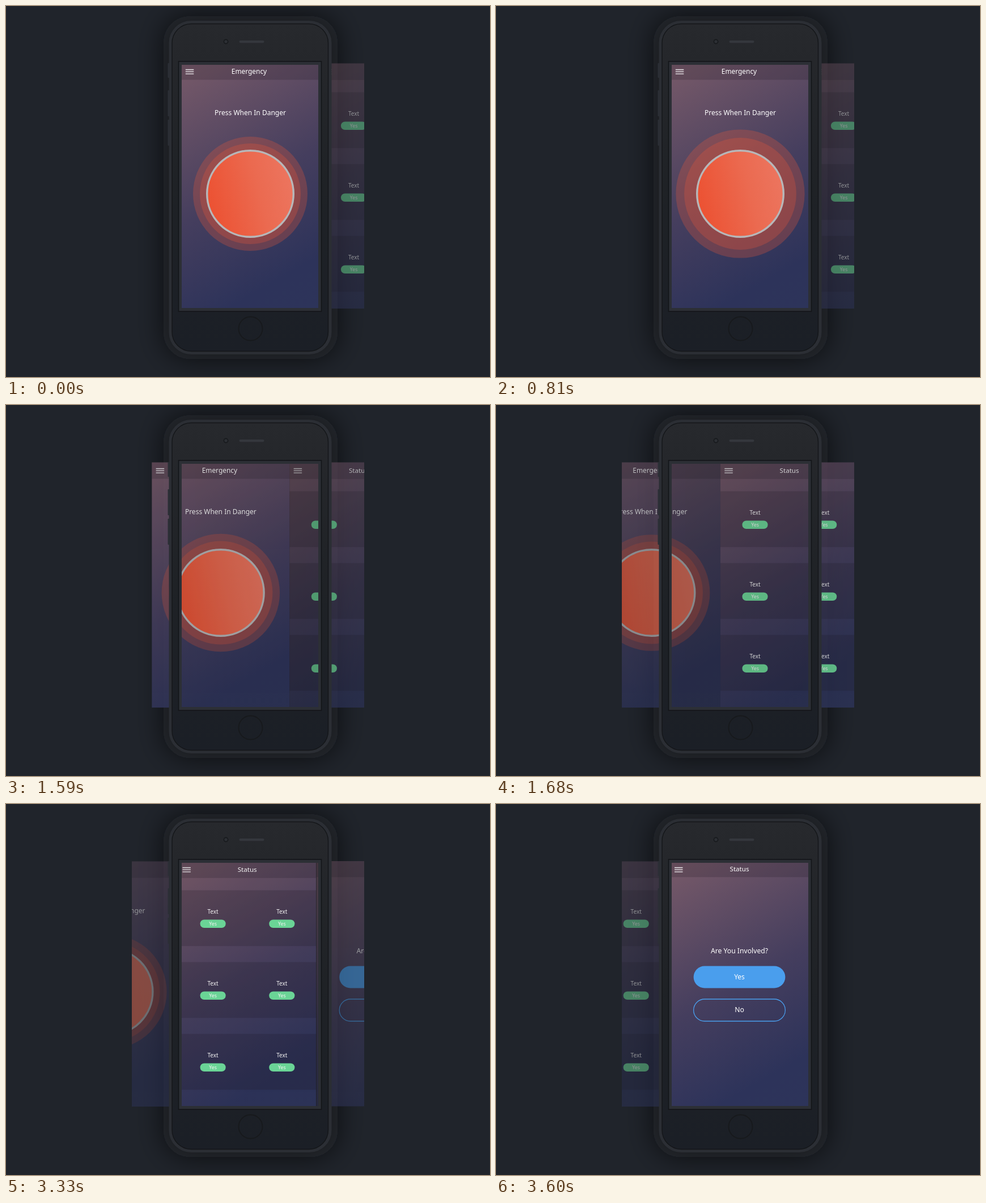
Recreate the animation shown at these times as an HTML page. Size 854 by 656 pixels, loop 4950 ms.

```html
<!DOCTYPE html>
<html lang="en">
<head>
<meta charset="utf-8">
<title>Emergency app</title>
<style>
  html, body { margin: 0; width: 100%; height: 100%; overflow: hidden; background: #20242b; }
  svg { display: block; width: 854px; height: 656px; }
  text { font-family: "Noto Sans", "Open Sans", sans-serif; fill: #fff; text-anchor: middle; }
  .menu { stroke: #dcd8dc; stroke-width: 1.6; }
  .shade { fill: #1c1820; fill-opacity: .2; }
  .halo { fill: #ea5638; fill-opacity: .28; }
</style>
</head>
<body>
<svg viewBox="0 0 854 656">
  <defs>
    <linearGradient id="sky" gradientUnits="userSpaceOnUse" x1="-2.5" y1="103" x2="245.5" y2="533">
      <stop offset="0" stop-color="#785a69"/>
      <stop offset=".5" stop-color="#453e5e"/>
      <stop offset=".84" stop-color="#2d335a"/>
      <stop offset="1" stop-color="#2d345a"/>
    </linearGradient>
    <linearGradient id="alarm" x1="0" y1=".62" x2="1" y2=".38">
      <stop offset=".05" stop-color="#ec5334"/>
      <stop offset=".6" stop-color="#eb6a50"/>
      <stop offset="1" stop-color="#ec755f"/>
    </linearGradient>
    <linearGradient id="body" x1="0" y1="0" x2="0" y2="1">
      <stop offset="0" stop-color="#27292d"/>
      <stop offset=".12" stop-color="#25272b"/>
      <stop offset=".5" stop-color="#1f2226"/>
      <stop offset="1" stop-color="#1b1f26"/>
    </linearGradient>
    <filter id="blur" x="-50%" y="-50%" width="200%" height="200%">
      <feGaussianBlur stdDeviation="24"/>
    </filter>
    <clipPath id="strip"><rect x="222" y="101" width="410" height="434.5"/></clipPath>
    <mask id="glass" maskUnits="userSpaceOnUse" x="0" y="0" width="854" height="656">
      <rect width="854" height="656" fill="#fff"/>
      <rect x="310" y="104" width="241" height="430" fill="#000"/>
    </mask>
  </defs>

  <rect width="854" height="656" fill="#20242b"/>
  <rect x="278" y="18" width="307" height="606" rx="46" fill="#121314" fill-opacity=".66" filter="url(#blur)"/>
  <g id="panels" clip-path="url(#strip)"></g>

  <g mask="url(#glass)">
    <g fill="#2c2f36">
      <rect x="285.5" y="101" width="4" height="26" rx="1"/>
      <rect x="285.5" y="149" width="4" height="46" rx="1"/>
      <rect x="285.5" y="201" width="4" height="46" rx="1"/>
    </g>
    <rect x="287.5" y="26" width="287" height="590" rx="39" fill="#2b2e34"/>
    <rect x="293" y="31.5" width="275.5" height="579" rx="34" fill="url(#body)" stroke="#141619" stroke-width="1.4"/>
    <rect x="304.5" y="98" width="252" height="442" fill="#2c2f35" stroke="#131518" stroke-width="1.6"/>
    <circle cx="388" cy="63" r="3.6" fill="#2c2f34" stroke="#17191c" stroke-width="1.6"/>
    <rect x="411.5" y="61" width="44" height="4.2" rx="2.1" fill="#34373d"/>
    <circle cx="431.5" cy="570.5" r="21" fill="none" stroke="#17191c" stroke-width="1.8"/>
  </g>
</svg>

<script>
const LOOP = 4950, STEP = 30, SLIDE = 300;
const FIRST = 1500, SECOND = 3300;   // start times of the two swipes
const PULSE = 900;                   // time for the halo to grow once
const DIM = 0.5;                     // opacity of a panel beside the phone

const label = (s, x, y, size) => `<text x="${x}" y="${y}" font-size="${size}">${s}</text>`;
const rect = (x, y, w, h, attrs) => `<rect x="${x}" y="${y}" width="${w}" height="${h}" ${attrs}/>`;

function panel(top, title, titleX, titleY, headerEnd, menuX, content) {
  const lines = [112.6, 116.3, 120].map(y => `M${menuX} ${y}h14.5`).join('');
  return `<g class="panel">
    ${rect(0, top, 243, 433.5, 'fill="url(#sky)"')}
    ${rect(0, top, 243, headerEnd - top, 'class="shade"')}
    <path class="menu" d="${lines}"/>
    ${label(title, titleX, titleY, title === 'Status' ? 11.6 : 11.9)}
    ${content}</g>`;
}

const alarm = label('Press When In Danger', 121.5, 193, 12) +
  `<circle class="halo" cx="121.5" cy="332"/><circle class="halo" cx="121.5" cy="332"/>
   <circle cx="121.5" cy="332" r="76.3" fill="url(#alarm)" stroke="#b7b7b9" stroke-width="3.4"/>`;

const rows = [0, 127, 254].map(dy =>
  rect(0, 152.5 + dy, 243, 98.7, 'class="shade"') +
  [61, 182.7].map(x =>
    label('Text', x, 194.3 + dy, 10) +
    rect(x - 22.6, 204.5 + dy, 45.2, 14.5, 'rx="7.25" fill="#6fdf9d"') +
    label('Yes', x, 215 + dy, 8.8)).join('')).join('');

const question = label('Are You Involved?', 121.5, 263.6, 12.2) +
  rect(40.6, 286.5, 161.8, 39, 'rx="19.5" fill="#4a9eed"') +
  label('Yes', 121.5, 310, 12) +
  rect(40.6, 345, 161.8, 39, 'rx="19.5" fill="none" stroke="#4a9eed" stroke-width="1.3"') +
  label('No', 121.5, 368.4, 12.2);

const holder = document.getElementById('panels');
holder.innerHTML =
  panel(101.5, 'Emergency', 119.5, 120.2, 130.5, 7.3, alarm) +
  panel(101.5, 'Status', 121.6, 120.4, 130.8, 7.3, rows) +
  panel(101, 'Status', 121.5, 119, 129.3, 7, question);

const panels = holder.querySelectorAll('.panel');
const halos = holder.querySelectorAll('.halo');

const clamp = v => Math.min(1, Math.max(0, v));
const ease = u => u * u * (3 - 2 * u);

function draw(ms) {
  const t = Math.floor((ms % LOOP) / STEP) * STEP;

  const grow = clamp(1 - Math.abs(t - PULSE) / PULSE);
  halos[0].setAttribute('r', 101 + 14 * grow);
  halos[1].setAttribute('r', 89 + 11 * grow);

  const a = clamp((t - FIRST) / SLIDE);
  const b = clamp((t - SECOND) / SLIDE);
  const shift = 241.5 * ease(a) + 246.5 * ease(b);
  const lit = [1 - a, a - b, b];
  [309.5, 552.5, 796].forEach((x, i) => {
    panels[i].setAttribute('transform', `translate(${x - shift} 0)`);
    panels[i].setAttribute('opacity', DIM + (1 - DIM) * lit[i]);
  });
}

function tick() {
  draw(performance.now());
  requestAnimationFrame(tick);
}
tick();
</script>
</body>
</html>
```
